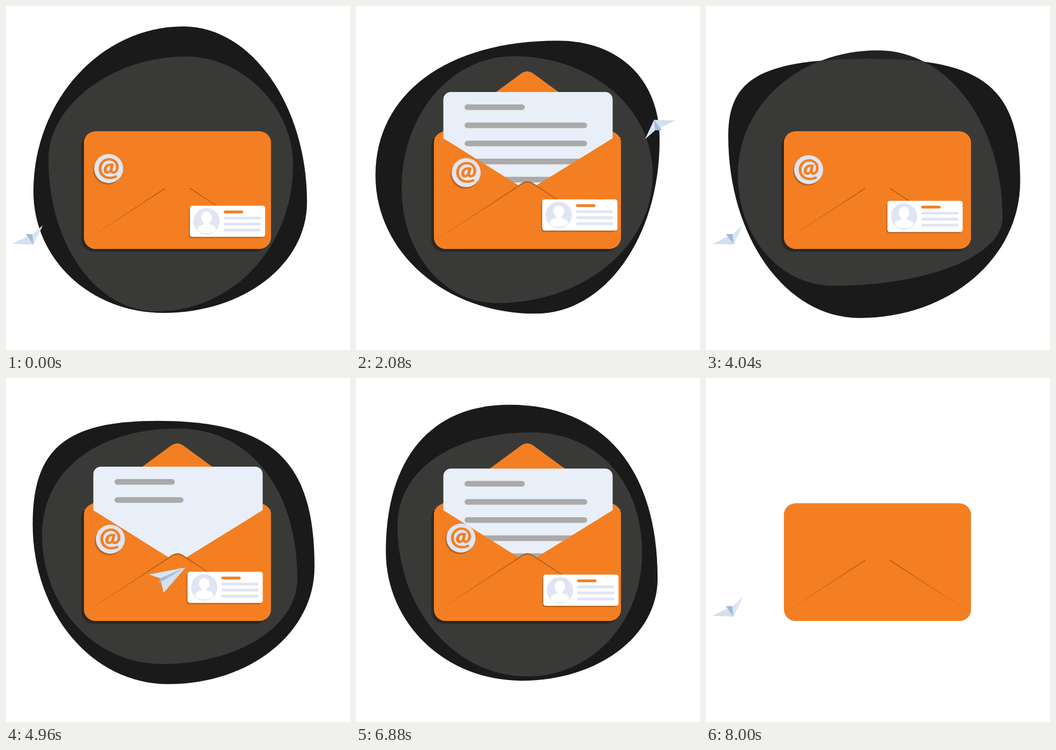
These frames come from a looping animation (640x640 px, 8040 ms). An HTML page with a canvas:

```html
<!DOCTYPE html>
<html lang="en">
<head>
<meta charset="utf-8">
<title>Mail</title>
<style>
html, body { margin: 0; width: 100%; height: 100%; overflow: hidden; background: #fff; }
canvas { display: block; width: 640px; height: 640px; }
</style>
</head>
<body>
<canvas id="stage" width="640" height="640"></canvas>
<script>
const ctx = document.getElementById('stage').getContext('2d');

const LOOP = 8040, STEP = 40, FULL = 8000, CYCLE = 4000;
const ORANGE = '#f47f22', FOLD = '#b9611c', SHADE = '#bd631d', PALE = '#dfe5f3', PAPER = '#e9eff8';

// Each blob passes four evenly timed poses: its left, top, right and
// bottom points, then how square its upper half is
const OUTER = [
  [51, 345, 330, 38, 560, 365, 293, 571, 0.55],
  [36, 318, 378, 63, 564, 246, 336, 572, 0.6],
  [41, 240, 310, 99, 585, 325, 285, 581, 0.76],
  [59, 305, 250, 59, 562, 380, 320, 557, 0.7]
];
const INNER = [
  [79, 285, 335, 94, 534, 295, 280, 568, 0.53],
  [86, 340, 292, 94, 552, 310, 262, 554, 0.56],
  [59, 315, 320, 82, 552, 395, 235, 520, 0.56],
  [76, 265, 320, 107, 531, 350, 350, 545, 0.64]
];

const mix = (a, b, p) => a + (b - a) * p;
const span = (t, a, b) => Math.min(1, Math.max(0, (t - a) / (b - a)));
const sine = p => 0.5 - 0.5 * Math.cos(Math.PI * p);
const quad = p => p < 0.5 ? 2 * p * p : 1 - 2 * (1 - p) * (1 - p);

function fill(path, color) {
  ctx.fillStyle = color;
  ctx.fill(path);
}

function poly(points, color) {
  const p = new Path2D();
  points.forEach(([x, y]) => p.lineTo(x, y));
  p.closePath();
  fill(p, color);
}

function roundBox(x, y, w, h, r) {
  const p = new Path2D();
  p.roundRect(x, y, w, h, r);
  return p;
}

const box = (x, y, w, h, r, color) => fill(roundBox(x, y, w, h, r), color);

function oval(x, y, rx, ry, color) {
  const p = new Path2D();
  p.ellipse(x, y, rx, ry, 0, 0, Math.PI * 2);
  fill(p, color);
}

function blobPath(poses, t) {
  const at = t / FULL * poses.length, i = Math.floor(at);
  const next = poses[(i + 1) % poses.length];
  const [lx, ly, tx, ty, rx, ry, bx, by, k] = poses[i].map((v, j) => mix(v, next[j], at - i));
  const low = 0.56, p = new Path2D();
  p.moveTo(lx, ly);
  p.bezierCurveTo(lx, mix(ly, ty, k), mix(tx, lx, k), ty, tx, ty);
  p.bezierCurveTo(mix(tx, rx, k), ty, rx, mix(ry, ty, k), rx, ry);
  p.bezierCurveTo(rx, mix(ry, by, low), mix(bx, rx, low), by, bx, by);
  p.bezierCurveTo(mix(bx, lx, low), by, lx, mix(ly, by, low), lx, ly);
  return p;
}

function drawBlobs(t) {
  const outer = blobPath(OUTER, t), inner = blobPath(INNER, t);
  fill(outer, '#1a1a1a');
  fill(inner, '#222222');
  ctx.save();
  ctx.clip(outer);
  fill(inner, '#393a38');
  ctx.restore();
}

const body = roundBox(145, 233, 348, 219, 22);

function foldPath(drop) {
  const p = new Path2D();
  p.moveTo(148, 436);
  p.lineTo(304, 332.5 + drop);
  p.quadraticCurveTo(319, 319.5 + drop, 334, 332.5 + drop);
  p.lineTo(491, 436);
  p.lineTo(491, 452);
  p.lineTo(148, 452);
  p.closePath();
  return p;
}

function drawOpenFlap(s) {
  const y = 235 - 118 * s, p = new Path2D();
  p.moveTo(145, 246);
  p.lineTo(159, 235);
  p.lineTo(308, y + 8 * s);
  p.quadraticCurveTo(318.5, y + s, 329, y + 8 * s);
  p.lineTo(479, 235);
  p.lineTo(493, 246);
  p.closePath();
  fill(p, ORANGE);
}

function drawLetter(t) {
  const up = sine(span(t, 450, 1060)), down = sine(span(t, 2720, 3460));
  const y = 160 + 77 * (1 - up + down);
  box(162.5, y, 315, 215, 14, PAPER);
  for (let i = 0; i < 5; i++) {
    const start = 632 + i * 210, p = span(t, start, start + 210);
    const w = i ? 228 : 112;
    if (p > 0) box(202, y + 23 + i * 33.7, Math.max(10.5, w * p), 10.5, 5.25, '#aaaaaa');
  }
}

function drawEnvelope(t, plain) {
  // Flap height: 1 is open, -1 is folded down
  const s = 2 * sine(span(t, 80, 560)) - 2 * sine(span(t, 3360, 3900)) - 1;
  if (!plain) box(140, 238, 348, 219, 22, 'rgba(0,0,0,.3)');
  fill(body, ORANGE);
  if (s > 0) drawOpenFlap(s);
  if (s > -1) drawLetter(t);

  ctx.save();
  ctx.clip(body);
  poly([[145, 233], [162.5, 246], [319, 344], [477.5, 246], [493, 233], [493, 452], [145, 452]], ORANGE);
  fill(foldPath(0), FOLD);
  fill(foldPath(2.8), ORANGE);
  if (s < 0) poly([[145, 235], [319, 235 - 120 * s], [493, 235]], ORANGE);
  ctx.restore();
}

function drawBadge(x, y) {
  oval(x - 2, y + 3, 27, 27, SHADE);
  oval(x, y, 27, 27, PALE);
  ctx.font = '900 48px Lato, "Open Sans", sans-serif';
  ctx.fillStyle = ORANGE;
  const m = ctx.measureText('@');
  ctx.fillText('@',
    x + (m.actualBoundingBoxLeft - m.actualBoundingBoxRight) / 2,
    y + (m.actualBoundingBoxAscent - m.actualBoundingBoxDescent) / 2);
}

function drawCard(x, y) {
  ctx.save();
  ctx.translate(x, y);
  box(-2, 2.5, 140, 58, 5, SHADE);
  box(0, 0, 140, 58, 4.5, '#ffffff');
  oval(31, 29, 24.5, 24.5, PALE);
  oval(31, 22.5, 10, 11, '#ffffff');
  box(26.5, 29, 9, 9, 2, '#ffffff');
  oval(31, 43, 17, 8.5, '#ffffff');
  box(63, 9, 36, 5.2, 2.6, ORANGE);
  for (let i = 0; i < 3; i++) box(63, 20.4 + i * 11.2, 69, 5.2, 2.6, PALE);
  ctx.restore();
}

function drawFloating(t) {
  const a = t / FULL * Math.PI * 2;
  const { sin, cos } = Math;
  drawBadge(196.5 - 5.5 * cos(2 * a) + 3 * sin(a), 303.5 + 6.5 * sin(a - 0.17));
  drawCard(
    343 + 2.2 * cos(a) - 3.1 * cos(2 * a) - 3.5 * sin(2 * a),
    363.5 + 4.5 * cos(a) + 3.5 * cos(2 * a));
}

// The plane flies a flat loop and makes a foreshortened U-turn at both ends
function drawPlane(t) {
  const out = t < 1950;
  const e = quad(out ? span(t, 0, 1950) : span(t, 1950, 4000));
  const along = out ? e : 1 - e;
  const bow = 42 * Math.sin(Math.PI * e) * (out ? 1 : -1);

  const quarter = start => sine(span(t, start, start + 560)) / 2;
  const turn = quarter(0) + quarter(1480) + quarter(2040) + quarter(3440) - 0.5;
  const bank = Math.abs(Math.sin(Math.PI * turn));

  ctx.save();
  ctx.translate(mix(44, 566, along), mix(431, 224, along) + bow);
  ctx.rotate(-0.496 - Math.PI * turn);
  ctx.scale(1 - 0.65 * bank, 1 + 0.55 * bank);
  const nose = [42, 0], notch = [-9, -5];
  poly([nose, notch, [-16, 22]], '#d3e0f0');
  poly([nose, notch, [-15 - 12 * bank, 2]], '#a3bbd9');
  poly([nose, [-24, -21], notch], '#d9e5f3');
  ctx.restore();
}

function draw(t) {
  const plain = t >= FULL;
  const local = plain ? CYCLE : t % CYCLE;
  const ahead = local < 1950;
  ctx.fillStyle = '#ffffff';
  ctx.fillRect(0, 0, 640, 640);
  if (!plain) drawBlobs(t);
  if (!ahead) drawPlane(local);
  drawEnvelope(local, plain);
  if (!plain) drawFloating(t);
  if (ahead) drawPlane(local);
}

function tick() {
  const t = performance.now() % LOOP;
  draw(Math.floor(t / STEP) * STEP);
  requestAnimationFrame(tick);
}
tick();
</script>
</body>
</html>
```
